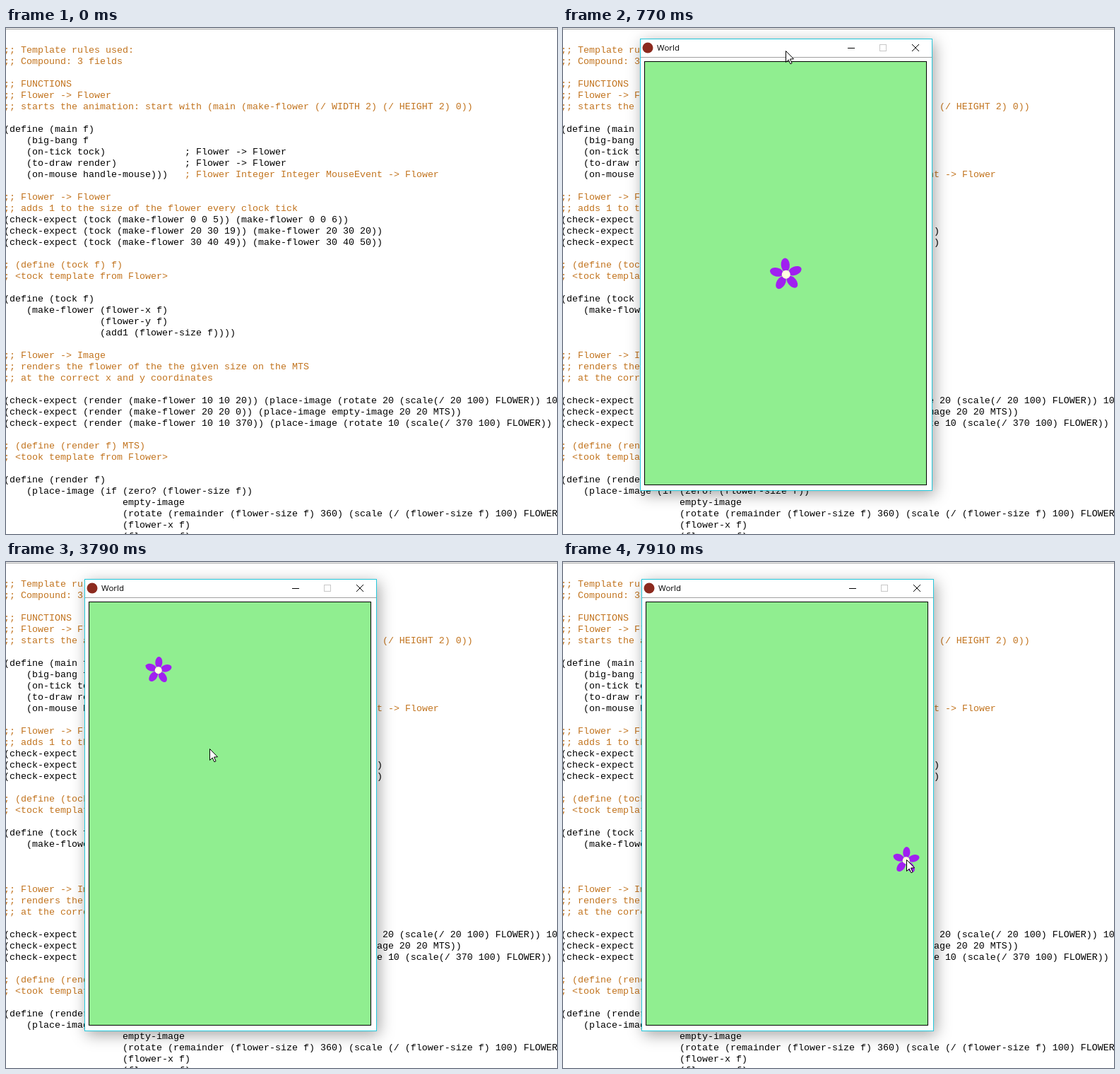
An HTML page with a canvas that plays this animation: 780x716 px, repeating every 7990 ms.

```html
<!DOCTYPE html>
<html lang="en">
<head>
<meta charset="utf-8">
<title>Flower</title>
<style>
html, body { margin: 0; width: 780px; height: 716px; overflow: hidden; background: #fff; }
body { position: relative; }
#rule { position: absolute; left: 0; top: 1px; width: 780px; height: 1px; background: #a0a0a0; }
pre {
  position: absolute; left: -3px; top: 24px; margin: 0; color: #000;
  font: 13.333px/16px "Liberation Mono", "Courier New", monospace;
}
pre i { font-style: normal; color: #c2741f; }
canvas { position: absolute; left: 0; top: 0; }
</style>
</head>
<body>
<div id="rule"></div>
<pre><i>;; Template rules used:
;; Compound: 3 fields

;; FUNCTIONS
;; Flower -&gt; Flower
;; starts the animation: start with (main (make-flower (/ WIDTH 2) (/ HEIGHT 2) 0))</i>

(define (main f)
    (big-bang f
    (on-tick tock)              ; Flower -&gt; Flower
    (to-draw render)            ; Flower -&gt; Flower
    (on-mouse handle-mouse)))   <i>; Flower Integer Integer MouseEvent -&gt; Flower</i>

<i>;; Flower -&gt; Flower
;; adds 1 to the size of the flower every clock tick</i>
(check-expect (tock (make-flower 0 0 5)) (make-flower 0 0 6))
(check-expect (tock (make-flower 20 30 19)) (make-flower 20 30 20))
(check-expect (tock (make-flower 30 40 49)) (make-flower 30 40 50))

<i>; (define (tock f) f)
; &lt;tock template from Flower&gt;</i>

(define (tock f)
    (make-flower (flower-x f)
                 (flower-y f)
                 (add1 (flower-size f))))

<i>;; Flower -&gt; Image
;; renders the flower of the the given size on the MTS
;; at the correct x and y coordinates</i>

(check-expect (render (make-flower 10 10 20)) (place-image (rotate 20 (scale(/ 20 100) FLOWER)) 10 10 MTS))
(check-expect (render (make-flower 20 20 0)) (place-image empty-image 20 20 MTS))
(check-expect (render (make-flower 10 10 370)) (place-image (rotate 10 (scale(/ 370 100) FLOWER)) 10 10 MTS))

<i>; (define (render f) MTS)
; &lt;took template from Flower&gt;</i>

(define (render f)
    (place-image (if (zero? (flower-size f))
                     empty-image
                     (rotate (remainder (flower-size f) 360) (scale (/ (flower-size f) 100) FLOWER)))
                     (flower-x f)
                     (flower-y f)</pre>
<canvas id="stage" width="780" height="716"></canvas>
<script>
const ctx = document.getElementById('stage').getContext('2d');
const LOOP = 7990, OPEN = 230, STEP = 77.58;
const TICK = 33.1;                       // ms per unit of flower growth
const GRAB = 465, DROP = 925;            // the window is dragged in between
const FREEZE = 390, THAW = 1140;         // no ticks while the window is held

// Where the pointer rests; a click plants a new flower there.
const stops = [
  { x: 317, y: 41, arrive: 0, leave: 1130 },
  { x: 375.5, y: 308, arrive: 1470, leave: 1930 },
  { x: 216, y: 152, arrive: 2550, leave: 3450, click: 2713 },
  { x: 289.5, y: 267, arrive: 3830, leave: 3980, click: 3840 },
  { x: 426, y: 99, arrive: 4450, leave: 5850, click: 4663 },
  { x: 486, y: 421, arrive: 6550, leave: LOOP, click: 6817 }
];

const clamp = u => Math.min(1, Math.max(0, u));
const ease = u => u * u * (3 - 2 * u);
const mix = (a, b, u) => a + (b - a) * u;

function windowShift(t) {
  const u = clamp((t - GRAB) / (DROP - GRAB));
  return [Math.round(18 * Math.sin(u * Math.PI / 2)), Math.round(16 * u * u)];
}

function pointerAt(t) {
  const i = stops.findLastIndex(s => s.arrive <= t);
  const a = stops[i], b = stops[i + 1] || a;
  const u = ease(clamp((t - a.leave) / (b.arrive - a.leave || 1)));
  return [mix(a.x, b.x, u), mix(a.y, b.y, u)];
}

function line(color, ...pts) {
  ctx.strokeStyle = color;
  ctx.beginPath();
  for (const [x1, y1, x2, y2] of pts) { ctx.moveTo(x1, y1); ctx.lineTo(x2, y2); }
  ctx.stroke();
}

function disc(x, y, r, color) {
  ctx.fillStyle = color;
  ctx.beginPath();
  ctx.arc(x, y, r, 0, 7);
  ctx.fill();
}

function box(x, y, w, h, stroke, fill) {
  if (fill) {
    ctx.fillStyle = fill;
    ctx.fillRect(x, y, w, h);
  }
  ctx.strokeStyle = stroke;
  ctx.strokeRect(x + 0.5, y + 0.5, w - 1, h - 1);
}

function drawWindow(dx, dy) {
  ctx.save();
  ctx.translate(dx, dy);
  ctx.lineWidth = 1;
  ctx.save();
  ctx.shadowColor = 'rgba(0,0,0,0.36)';
  ctx.shadowBlur = 20;
  ctx.shadowOffsetX = 3;
  ctx.shadowOffsetY = 5;
  ctx.fillStyle = '#fff';
  ctx.fillRect(93, 8, 414, 640);
  ctx.restore();
  box(93, 8, 414, 640, '#23c8dc');
  line('#a0a0a0', [94, 34.5, 506, 34.5]);

  disc(104, 21, 7.5, '#8c2a1e');
  ctx.fillStyle = '#000';
  ctx.font = '11.5px "Open Sans", "Noto Sans", sans-serif';
  ctx.fillText('World', 117, 25);
  line('#000', [387, 21.5, 397, 21.5]);
  box(432, 16, 10, 10, '#c8c8c8');
  line('#000', [478, 16, 488, 26], [488, 16, 478, 26]);
  box(99, 40, 400, 600, '#000', '#90ee90');
  ctx.restore();
}

// The middle of the flower's bounding box sits at (x, y).
function drawFlower(x, y, size) {
  if (size < 1) return;
  const d = 0.34 * size, a = 0.245 * size, b = 0.153 * size;
  const petals = [0, 1, 2, 3, 4].map(i => {
    const th = -(54 + size + 72 * i) * Math.PI / 180, c = Math.cos(th), s = Math.sin(th);
    return { th, x: d * c, y: d * s, w: Math.hypot(a * c, b * s), h: Math.hypot(a * s, b * c) };
  });
  const mid = (p, e) =>
    (Math.min(...petals.map(q => q[p] - q[e])) + Math.max(...petals.map(q => q[p] + q[e]))) / 2;
  const cx = x - mid('x', 'w'), cy = y - mid('y', 'h');
  ctx.fillStyle = '#a020f0';
  for (const p of petals) {
    ctx.beginPath();
    ctx.ellipse(cx + p.x, cy + p.y, a, b, p.th, 0, 7);
    ctx.fill();
  }
  disc(cx, cy, 0.15 * size, '#ffffe0');
}

const arrow = new Path2D('M0 0V16L3.7 12.5L6.4 18.3L8.6 17.3L6 11.5L11 11.3Z');

function drawPointer(x, y) {
  ctx.save();
  ctx.translate(Math.floor(x) + 0.5, Math.floor(y) + 0.5);
  ctx.fillStyle = '#fff';
  ctx.fill(arrow);
  ctx.strokeStyle = '#000';
  ctx.stroke(arrow);
  ctx.restore();
}

function render(now) {
  ctx.clearRect(0, 0, 780, 716);
  if (now < OPEN) return;
  const t = OPEN + Math.floor((now - OPEN) / STEP + 0.3) * STEP;
  const [dx, dy] = windowShift(t);
  drawWindow(dx, dy);

  const planted = stops.findLast(s => s.click <= t);
  if (planted) {
    drawFlower(planted.x, planted.y, Math.round((t - planted.click) / TICK));
  } else {
    const run = Math.min(t, FREEZE) + Math.max(0, t - THAW);
    drawFlower(299.3 + dx, 340.3 + dy, Math.round(28.5 + run / TICK));
  }

  const [px, py] = pointerAt(t);
  const held = t < DROP;
  drawPointer(held ? px - 18 + dx : px, held ? py - 16 + dy : py);
}

let start;
function loop(now) {
  if (start === undefined) start = now;
  render((now - start) % LOOP);
  requestAnimationFrame(loop);
}
requestAnimationFrame(loop);
</script>
</body>
</html>
```
